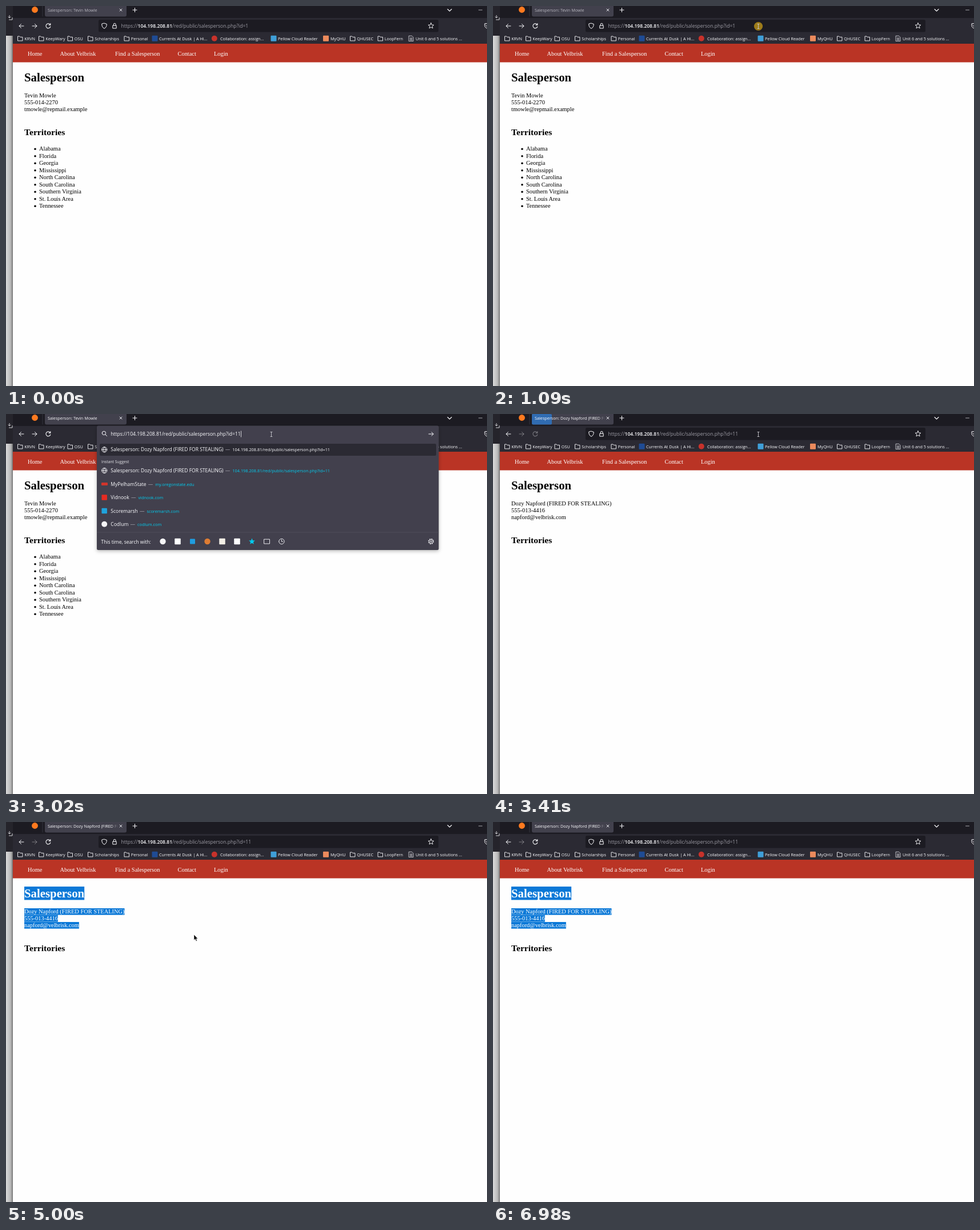
An HTML page that plays this animation: 842 px wide and 665 px high, repeating every 7.12 s.

```html
<!DOCTYPE html>
<html lang="en">
<head>
<meta charset="utf-8">
<title>Salesperson</title>
<style>
  html, body { margin: 0; width: 100%; height: 100%; overflow: hidden; background: #fefefe; }
  svg { display: block; width: 100vw; height: 100vh; }
  text { white-space: pre; }
  .ui { font-family: "Open Sans", "Noto Sans", sans-serif; }
  .doc { font-family: "Liberation Serif", "Times New Roman", serif; }
  .line { fill: none; stroke-linecap: round; stroke-linejoin: round; }
</style>
</head>
<body>
<svg id="stage" viewBox="0 0 842 665"></svg>
<script>
const LOOP = 7120, TICK = 65;
const LIGHT = '#fbfbfe', CYAN = '#00cbee', PANEL = '#42414d', DARK = '#1c1b22', BAR = '#2b2a33';
const BLUE = '#0a78d7', LEFT = 12, NAV_END = 98.5;

// --- markup helpers ---
const rect = (x, y, w, h, fill, more = '') =>
  `<rect x="${x}" y="${y}" width="${w}" height="${h}" fill="${fill}" ${more}/>`;
const dot = (x, y, r, fill, more = '') =>
  `<circle cx="${x}" cy="${y}" r="${r}" fill="${fill}" ${more}/>`;
const line = (d, color = LIGHT, w = 1) =>
  `<path class="line" d="${d}" stroke="${color}" stroke-width="${w}"/>`;
const ui = (x, y, size, str, fill = LIGHT, more = '') =>
  `<text class="ui" x="${x}" y="${y}" font-size="${size}" fill="${fill}" ${more}>${str}</text>`;
const doc = (x, y, size, str, fill = '#000', more = '') =>
  `<text class="doc" x="${x}" y="${y}" font-size="${size}" fill="${fill}" ${more}>${str}</text>`;
const group = (id, body) => `<g id="${id}">${body}</g>`;
const square = (cx, cy, size, fill) =>
  rect(cx - size / 2, cy - size / 2, size, size, fill, 'rx="1"');
const star = (cx, cy, r) => {
  let d = '';
  for (let i = 0; i < 10; i++) {
    const a = Math.PI * (i / 5 - 0.5), q = i % 2 ? r * 0.45 : r;
    d += `${i ? 'L' : 'M'}${(cx + q * Math.cos(a)).toFixed(2)} ${(cy + q * Math.sin(a)).toFixed(2)}`;
  }
  return d + 'Z';
};

// --- browser frame ---
const HOST = '104.198.208.81', PATH = '/red/public/salesperson.php?id=1';

function chrome() {
  const tabs =
    rect(0, 0, 842, 21, DARK) + rect(0, 21, 842, 45, BAR) +
    rect(0, 0, LEFT, 52, '#25242b') +
    line('M6 16.5V20.5M4 19L6 21L8 19M5.5 24H11V20.5', '#d8d8dc', 1) +
    dot(50.5, 6.5, 5.4, '#ff7a1f') +
    line('M64 0V18', '#3b3a44', 0.8) +
    `<path d="M68 0H211V15.5Q211 18.5 208 18.5H71Q68 18.5 68 15.5Z" fill="${PANEL}"/>` +
    rect(68, 0, 0, 18.5, '#2f72bd', 'id="burst" rx="2"') +
    `<g clip-path="url(#tabClip)">${ui(73, 10.1, 7.26, '', LIGHT, 'id="tabTitle"')}</g>` +
    rect(184, 0, 12, 18, 'url(#tabFade)', 'id="fade"') +
    line('M199 5L203 9M203 5L199 9', LIGHT, 0.9) +
    line('M222 7H229M225.5 3.5V10.5', LIGHT, 1) +
    line('M773 5.5L776.5 9L780 5.5', LIGHT, 1.1) +
    line('M827.5 7H833.5', '#b8b8be', 0.9);

  const nav =
    line('M31 35H23M26.5 31.5L23 35L26.5 38.5') +
    group('forward', line('M46 35H54M50.5 31.5L54 35L50.5 38.5')) +
    group('reload', line('M77 32.3A4 4 0 1 0 77.8 36M77.8 30.5V33.2H75.1', LIGHT, 1.1)) +
    rect(162, 24, 595, 21.5, DARK, 'rx="2.5"') +
    line('M172 30.2L176.3 31.6Q176.4 37.4 172 39.4Q167.6 37.4 167.7 31.6Z') +
    line('M187.2 34.2H193.2V39H187.2ZM188.3 34V32.2A1.9 1.9 0 0 1 192.1 32.2V34') +
    `<text class="ui" x="201.5" y="38.1" font-size="8.52" fill="#9d9ca5">https://` +
    `<tspan fill="${LIGHT}" font-weight="600">${HOST}</tspan>${PATH}<tspan id="urlTail"></tspan></text>` +
    line(star(744, 34.8, 5.2), LIGHT, 0.9) +
    line('M843 30.8H838V34.5A5 4.6 0 0 0 843 39M840 34L843 36.6', LIGHT, 1);

  const folders = [[20, 'KRVN'], [57, 'KeepWary'], [107.5, 'OSU'], [143, 'Scholarships'],
    [206.5, 'Personal'], [602, 'QHUSEC'], [650.5, 'LoopFern']];
  const links = [[268, 'Currents At Dusk | A Hi...'], [375, 'Collaboration: assign...'],
    [476, 'Pellow Cloud Reader'], [568, 'MyQHU'], [717, 'Unit 6 and 5 solutions ...']];
  const marks =
    folders.map(([x, s]) =>
      line(`M${x + .5} 60.5V53H${x + 3.6}L${x + 4.8} 54.4H${x + 9}V60.5Z`, LIGHT, 0.9) +
      ui(x + 12.3, 59.7, 7.26, s)).join('') +
    links.map(([x, s]) => ui(x, 59.7, 7.26, s)).join('') +
    square(260.5, 56.8, 10, '#1f4b94') + dot(364.8, 56.8, 5, '#c8322b') +
    square(468.5, 56.8, 10, '#3f9fd8') + square(560, 56.8, 10, '#ec8a5c') +
    line('M705.5 52.3H710.5L713 54.8V61.5H705.5ZM707.3 56H711M707.3 57.8H711M707.3 59.6H711', '#e8e8ec', 0.8);

  return tabs + nav + marks;
}

// --- page ---
const STATES = ['Alabama', 'Florida', 'Georgia', 'Mississippi', 'North Carolina',
  'South Carolina', 'Southern Virginia', 'St. Louis Area', 'Tennessee'];
const details = lines => lines.map((s, i) => doc(32, 160.3 + 12 * i, 10.4, s)).join('');

function page() {
  const menu = [[38, 'Home'], [94.5, 'About Velbrisk'], [191, 'Find a Salesperson'],
    [300.5, 'Contact'], [364, 'Login']];
  return rect(LEFT, 66, 842 - LEFT, 599, '#fefefe') +
    rect(LEFT, 66, 842 - LEFT, NAV_END - 66, '#ba3425') +
    menu.map(([x, s]) => doc(x, 87, 10.4, s, '#fff')).join('') +
    rect(0, 52, LEFT, 613, 'url(#edge)') +
    group('marked', '') +
    doc(32, 131.8, 20.8, 'Salesperson', '#000', 'id="head" font-weight="700"') +
    doc(32, 226, 15.6, 'Territories', '#000', 'font-weight="700"') +
    group('first',
      details(['Tevin Mowle', '555-014-2270', 'tmowle@repmail.example']) +
      STATES.map((s, i) => dot(51, 250.3 + 12.5 * i, 1.75, '#000') +
        doc(58, 253.1 + 12.5 * i, 10.4, s)).join('')) +
    group('second',
      details(['Dozy Napford (FIRED FOR STEALING)', '555-013-4416', 'napford@velbrisk.com']));
}

// --- address panel ---
const globe = y => line(`M167.6 ${y}a4.6 4.6 0 1 0 9.2 0a4.6 4.6 0 1 0 -9.2 0H176.8` +
  `M172.2 ${y - 4.6}q-4.4 4.6 0 9.2q4.4 -4.6 0 -9.2`, LIGHT, 0.9);
const row = (y, icon, name, url, color = CYAN) => icon +
  `<text class="ui" x="183.3" y="${y + 3.1}" font-size="8.52" fill="${LIGHT}">${name}` +
  `<tspan dx="3.2" fill="#a9a8b2">—</tspan><tspan dx="4" font-size="7.34" fill="${color}">${url}</tspan></text>`;

function panel() {
  const hit = 'Salesperson: Dozy Napford (FIRED FOR STEALING)', hitUrl = HOST + PATH + '1';
  const sites =
    row(122.5, rect(167, 120, 11, 5, '#d0352b', 'rx="1"'), 'MyPelhamState', 'my.oregonstate.edu') +
    row(146, square(172.2, 146, 9.5, '#e62b22'), 'Vidnook', 'vidnook.com') +
    row(169.5, square(172.2, 169.5, 9.5, '#1fa3dc'), 'Scoremarsh', 'scoremarsh.com') +
    row(193, dot(172.2, 192.8, 5, '#f4f4f6'), 'Codlum', 'codlum.com') +
    line('M159.5 207H757', '#55545f', 0.7) +
    ui(166.5, 226.5, 8.45, 'This time, search with:') +
    dot(274.5, 223, 5.2, '#f6f6f8') + square(300.5, 223, 10.5, '#fff') +
    square(326.5, 223, 9, '#1f9de0') + dot(352.5, 223, 5.2, '#de7c33') +
    square(378.5, 223, 10.5, '#f3efe6') + square(404.5, 223, 10.5, '#fff') +
    `<path d="${star(430.5, 223.2, 5.6)}" fill="${CYAN}"/>` +
    line('M452 219.2H461.5V227H452Z', LIGHT, 0.9) +
    line('M477.7 223a4.7 4.7 0 1 0 9.4 0a4.7 4.7 0 1 0 -9.4 0M482.4 220V223.2H484.6', LIGHT, 0.9) +
    dot(744, 223, 4.3, 'none', `stroke="${LIGHT}" stroke-width="1.3" stroke-dasharray="1.9 1.48"`) +
    dot(744, 223, 3.4, 'none', `stroke="${LIGHT}" stroke-width=".8"`) +
    dot(744, 223, 1.3, 'none', `stroke="${LIGHT}" stroke-width=".8"`);

  return group('panel',
    rect(159, 20.5, 598.5, 217.5, PANEL, 'id="box" rx="2.5" filter="url(#soft)"') +
    line('M168.2 33.4a3.2 3.2 0 1 0 6.4 0a3.2 3.2 0 1 0 -6.4 0M173.8 35.8L176.6 38.6') +
    rect(183.3, 29, 0, 12, BLUE, 'id="picked"') +
    ui(183.3, 38.1, 8.52, '', LIGHT, 'id="entry"') +
    rect(0, 29.5, 0.8, 11, LIGHT, 'id="caret"') +
    line('M740 35H748M745 31.8L748.2 35L745 38.2') +
    group('hits',
      rect(164, 52, 589, 21, BAR, 'rx="2"') +
      row(62.3, globe(62.3), hit, hitUrl, LIGHT) +
      ui(167, 86, 6.75, 'Instant Suggest', '#e6e6ea') +
      row(99, globe(99), hit, hitUrl)) +
    group('sites', sites));
}

const stage = document.getElementById('stage');
stage.innerHTML = `<defs>
  <linearGradient id="edge"><stop offset="0" stop-color="#dadada"/><stop offset=".65" stop-color="#bababa"/>
    <stop offset=".92" stop-color="#8c8c8c"/><stop offset="1" stop-color="#5c5c5c"/></linearGradient>
  <linearGradient id="tabFade"><stop offset="0" stop-color="${PANEL}" stop-opacity="0"/>
    <stop offset="1" stop-color="${PANEL}"/></linearGradient>
  <clipPath id="tabClip"><rect x="68" width="128" height="18"/></clipPath>
  <filter id="soft" x="-5%" y="-10%" width="110%" height="125%">
    <feDropShadow dx="0" dy="2" stdDeviation="3" flood-opacity=".28"/></filter>
</defs>` + chrome() + page() + panel() +
  group('ring', dot(0, 0, 7.6, '#d9a916', 'fill-opacity=".68"')) +
  group('mouse',
    `<path id="arrow" d="M0 0V9.8L2.2 7.8L3.8 11.4L5.4 10.7L3.9 7.3H6.8Z" fill="#000" stroke="#fff" stroke-width=".6"/>` +
    `<path id="beam" class="line" d="M-1.5 -4H1.5M0 -4V4M-1.5 4H1.5" stroke-width=".9"/>`);

const el = {};
stage.querySelectorAll('[id]').forEach(n => { el[n.id] = n; });

// Selection boxes follow the measured text.
const picks = [...el.second.querySelectorAll('text')];
el.marked.innerHTML = rect(32, 113, el.head.getComputedTextLength(), 23.4, BLUE) +
  picks.map((n, i) => rect(32, 151 + 12 * i, n.getComputedTextLength(), 11.6, BLUE)).join('');

// --- timeline ---
const MOVES = [
  { from: 160, to: 3810, path: [[160, 803, 609], [225, 765, 446], [290, 727, 284], [355, 650, 150],
    [420, 580, 80], [485, 520, 48], [550, 490, 38], [615, 475, 35.5], [810, 464.5, 35.5]] },
  { from: 3810, to: 5590, path: [[3810, 462, 37], [3875, 450, 54], [3940, 414, 95], [4005, 375, 135],
    [4070, 360, 155], [4135, 357, 168], [4200, 345, 186], [4265, 338, 193], [4330, 334.5, 196], [4460, 329, 197]] },
  { from: 5590, to: 6190, path: [[5590, 324, 215], [5655, 298, 352], [5720, 390, 420], [5785, 515, 472],
    [5850, 686.5, 578], [5915, 742, 615], [5980, 790, 642], [6110, 838, 666]] }
];
const CLICKS = [[1020, 1220, 464.5, 35.5], [1420, 1490, 464.5, 35.5], [4530, 4730, 329, 197]];
const T = { open: 1150, place: 1490, type: 2670, enter: 3215, load: 3345, done: 3670, select: 4660 };

const lerp = (a, b, k) => a + (b - a) * Math.min(1, Math.max(0, k));
const show = (node, on) => { node.style.display = on ? '' : 'none'; };

function pointer(t) {
  const move = MOVES.find(m => t >= m.from && t < m.to);
  if (!move) return null;
  const now = move.from + Math.floor((t - move.from) / TICK) * TICK, p = move.path;
  let i = 0;
  while (i < p.length - 2 && now >= p[i + 1][0]) i++;
  const [a, b] = [p[i], p[i + 1]], k = (now - a[0]) / (b[0] - a[0]);
  return [lerp(a[1], b[1], k), lerp(a[2], b[2], k)];
}

function drawMouse(t) {
  const at = pointer(t);
  show(el.mouse, at);
  if (at) {
    const [x, y] = at, inBar = y > 24 && y < 46 && x > 162 && x < 757;
    const beam = inBar || (y > 113 && y < 137) || (y > 151 && y < 187);
    el.mouse.setAttribute('transform', `translate(${x} ${y})`);
    show(el.beam, beam);
    show(el.arrow, !beam);
    el.beam.setAttribute('stroke', inBar ? '#c9c9cf' : '#222');
  }
  const hit = CLICKS.find(c => t >= c[0] && t < c[1]);
  show(el.ring, hit);
  if (hit) el.ring.setAttribute('transform', `translate(${hit[2]} ${hit[3]})`);
}

function drawPanel(t) {
  const open = t >= T.open && t < T.enter, typed = t >= T.type;
  show(el.panel, open);
  if (!open) return;
  el.entry.textContent = 'https://' + HOST + PATH + (typed ? '1' : '');
  const w = el.entry.getComputedTextLength();
  el.picked.setAttribute('width', t < T.place ? w : 0);
  el.caret.setAttribute('x', 183.6 + w);
  show(el.caret, t >= T.place);
  show(el.hits, typed);
  el.sites.setAttribute('transform', `translate(0 ${typed ? 0 : -60.5})`);
  el.box.setAttribute('height', typed ? 217.5 : 157);
}

function drawPage(t) {
  const loaded = t >= T.load, marked = t >= T.select;
  show(el.first, !loaded);
  show(el.second, loaded);
  show(el.marked, marked);
  [el.head, ...picks].forEach(n => n.setAttribute('fill', marked ? '#fff' : '#000'));

  el.tabTitle.textContent = 'Salesperson: ' + (loaded ? 'Dozy Napford (FIRED FOR STEALING)' : 'Tevin Mowle');
  el.tabTitle.setAttribute('fill', t < T.open ? '#b9b8c0' : LIGHT);
  show(el.fade, loaded);
  el.urlTail.textContent = t >= T.enter ? '1' : '';
  el.forward.style.opacity = loaded ? 0.38 : 1;
  el.reload.style.opacity = loaded && t < T.done ? 0.38 : 1;

  const busy = loaded && t < T.done;
  show(el.burst, busy);
  if (busy) {
    const now = T.load + Math.floor((t - T.load) / TICK) * TICK;
    el.burst.setAttribute('width', now < 3410 ? 12 : lerp(35, 143, (now - 3410) / 195));
    el.burst.style.opacity = lerp(0.9, 0, (now - 3410) / 260);
  }
}

const start = performance.now();
function tick() {
  const t = (performance.now() - start) % LOOP;
  drawPage(t);
  drawPanel(t);
  drawMouse(t);
  requestAnimationFrame(tick);
}
tick();
</script>
</body>
</html>
```
